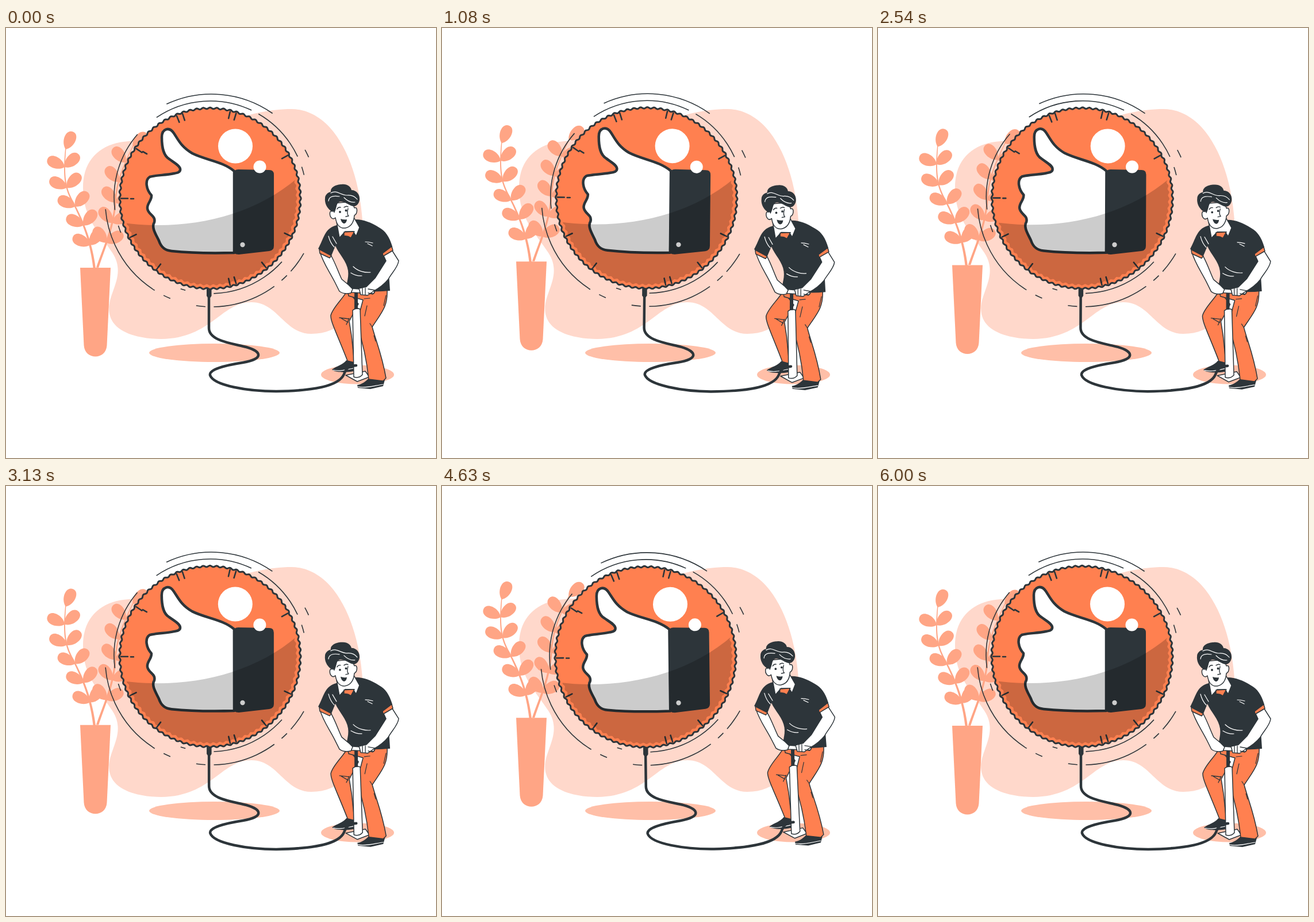
Recreate the animation shown at these times as an HTML page. Size 748x748 px, loop 6040 ms.

```html
<!DOCTYPE html>
<html lang="en">
<head>
<meta charset="utf-8">
<title>Pumping up the balloon</title>
<style>
  html, body { margin: 0; width: 100%; height: 100%; overflow: hidden; background: #fff; }
  svg { display: block; width: 100vw; height: 100vh; }
  .line { fill: none; stroke: #2d353a; stroke-linecap: round; stroke-linejoin: round; }
  .ink { fill: #2d353a; }
  .coral { fill: #ff8050; }
  .skin { fill: #fff; }
  .thin { stroke: #2d353a; stroke-width: 1.5; stroke-linecap: round; stroke-linejoin: round; }
  .fold { fill: none; stroke: #fff; stroke-width: 1.2; stroke-linecap: round; }
  .ring { fill: none; stroke: #2d353a; stroke-width: 1.6; }
</style>
</head>
<body>
<svg viewBox="0 0 748 748">
  <defs><clipPath id="inside"><path id="innerEdge"/></clipPath></defs>

  <path fill="#ffd8cb" d="M213 197C165 200 133 229 134 279C134 331 163 357 185 391C213 434 170 465 181 501C190 532 236 541 270 541C357 540 374 477 427 477C473 477 484 532 531 532C593 532 618 480 621 400C625 310 608 230 570 181C549 154 522 141 497 141C405 141 350 190 213 197Z"/>
  <ellipse cx="362.500" cy="565" rx="113.500" ry="16" fill="#ffbfa8"/>
  <ellipse cx="611.500" cy="603" rx="63.500" ry="16.500" fill="#ffbfa8"/>

  <g id="plant" fill="#ffa585">
    <path d="M129 417H182L175.500 552C174 578 137 578 135.500 552Z"/>
  </g>

  <g id="scene">
    <circle class="ring" r="167.500" pathLength="360" transform="translate(355.500 294.500) rotate(-124)" stroke-dasharray="59.300 4.700 35 6.600 5 55.400 46 17 3 50.500 4.400 9.500 48.400 15.200"/>
    <circle class="ring" r="185" pathLength="360" transform="translate(357.500 300) rotate(-115)" stroke-dasharray="60 26.500 4.500 53.800 12 3 4 5 35 4.500 5 14.500 4 5.500 53 69.700"/>
    <path id="rim" class="line" style="fill:#ff8050" stroke-width="3"/>
    <path id="creases" class="line" stroke-width="2.600"/>
    <path class="line" style="fill:#fff" stroke-width="4.500" d="M397 249C377 232 348 230 324 218C305 207 300 195 292 183C284 171 271 175 271 190C271 209 274 222 284 228C292 234 302 239 303 245C304 251 298 252 292 253C278 256 260 256 250 259C241 265 244 281 253 291C254 300 245 305 246 314C247 325 261 326 258 338C252 347 262 361 266 370C270 382 277 387 288 388C326 392 360 392 397 391Z"/>
    <path class="ink" d="M404 246L458 247Q466 247 466 255L466 379Q466 387 458 388L405 394Q395 394 395 386L396 254Q396 246 404 246Z"/>
    <circle cx="411.500" cy="377" r="4.200" fill="#fff"/>
    <path clip-path="url(#inside)" fill-opacity=".2" d="M190 338L204 339C310 353 425 331 507 261L520 250V470H190Z"/>
    <circle cx="399" cy="205.500" r="30" fill="#fff"/>
    <circle cx="441.500" cy="241.500" r="11" fill="#fff"/>

    <g id="man">
      <path class="skin thin" d="M591 604L625 597L632 607L611 615Z"/>
      <path class="ink" d="M567 594C575 588 586 586 592 578L606 582L605 597C590 600 570 599 567 594Z"/>
      <path class="fold" d="M569 595C582 598 592 594 604 592"/>
      <path class="coral thin" d="M594 456C588 469 568 486 565 500C564 510 577 535 594 579L606 582L601 535L597 510L613 480Z"/>
      <path class="line" stroke-width="1.300" d="M580 504L597 506M583 505L595 512M592 516L597 505"/>
      <path class="ink" d="M611 621C619 620 627 614 632 608L659 612L656 623L634 628L612 626Z"/>
      <path class="fold" d="M612 624C626 627 641 622 656 620"/>
      <path class="coral thin" d="M594 455L663 456C664 485 654 494 637 520C644 546 654 568 661 609L656 614L631 611C627 575 621 548 612 521C610 510 616 493 621 473L596 466Z"/>
      <path class="line" stroke-width="1.200" d="M628 483L624 501M661 465L657 483M633 514L637 520M640 535L643 545M623 471L633 470"/>
      <path class="skin thin" d="M603 491Q609 486 616 489L620 603Q614 610 605 607Z"/>
      <path class="ink" d="M606 456H612V489H606Z"/>

      <path class="ink" d="M572 344C554 350 553 366 543 384L566 396L573 379C579 393 593 406 595 422C597 437 590 446 594 454Q633 461 668 457L665 412L658 396L672 380C667 363 660 353 649 347C635 338 621 333 609 333Z"/>
      <path class="skin thin" d="M601 453L639 456Q643 459 639 462L601 460Z"/>
      <path class="skin thin" d="M546 389C551 408 563 424 572 442L580 458Q588 464 600 461L603 454L596 447L584 437C578 425 574 411 565 395Z"/>
      <path class="skin thin" d="M671 386L683 405C682 416 671 426 665 437C657 447 648 453 639 458L629 465L617 464L614 453L627 450L642 435L661 405L656 394Z"/>
      <path class="line" stroke-width="1.300" d="M620 452V463M625 452V464M630 454L641 456Q643 460 638 463L630 461"/>
      <path class="coral thin" d="M545 385L566 396L563 400L546 392Z"/>
      <path class="coral thin" d="M655 392L671 380L673 387L656 397Z"/>
      <path class="fold" d="M561 362Q564 374 571 381M568 363L575 375M625 372Q631 372 638 374M629 375L637 379M604 415C612 423 624 426 634 425M600 426Q610 432 619 431"/>
      <path class="skin thin" d="M575 337L580 365L590 354L604 354L609 362L615 347L606 331Z"/>
      <path class="coral thin" d="M588 355L606 354L600 365Q594 361 588 362Z"/>

      <path class="skin thin" d="M568 305L568 319C562 316 562 327 567 331Q570 333 573 330C575 342 581 349 590 348C600 346 605 339 606 326C612 323 612 310 606 313L602 302Z"/>
      <path class="ink" d="M565 318C558 313 554 304 555 296C555 290 560 286 565 285C564 277 574 272 584 272C593 271 600 276 601 282C610 282 616 290 615 299C614 306 609 311 604 310C597 309 592 303 583 302C575 302 576 309 573 317L571 322C569 317 567 318 565 318Z"/>
      <path class="fold" d="M561 301C562 291 573 292 580 293M565 287C575 281 582 291 593 291C602 290 607 293 611 298M588 295C593 300 599 304 607 303"/>
      <path class="line" stroke-width="1.400" d="M576 315Q578 311 582 312M588 312Q592 309 595 311M595 314C593 321 594 325 596 327L591 328"/>
      <circle cx="581" cy="320" r="1.900" class="ink"/>
      <circle cx="591.500" cy="317.500" r="1.900" class="ink"/>
      <path class="ink" d="M582 332Q588 334 593 333C592 343 584 342 582 332Z"/>
    </g>

    <path class="line" stroke-width="4.500" d="M353 464V522C353 545 396 549 418 555C446 563 448 576 412 582C380 587 353 594 355 604C361 622 421 632 470 632C532 631 579 624 588 602C592 591 597 588 609 587"/>
    <path class="ink" d="M349 453H357.500V466L355.500 469H351L349 466Z"/>
  </g>
</svg>
<script>
const LOOP = 6040, FRAME = 1000 / 24;
const get = id => document.getElementById(id);

function addPath(parent, d, transform = '') {
  const path = document.createElementNS('http://www.w3.org/2000/svg', 'path');
  path.setAttribute('d', d);
  path.setAttribute('transform', transform);
  parent.append(path);
  return path;
}

function balloonPoint(degrees, radius) {
  const a = degrees * Math.PI / 180;
  return `${355 + radius * Math.cos(a)} ${296.5 + radius * Math.sin(a)}`;
}

// Foil edge with evenly spaced crimps.
function crimpedCircle(radius) {
  const points = [];
  for (let a = 0; a < 360; a += 0.5) {
    points.push(balloonPoint(a, radius + 1.2 * Math.cos(84 * a * Math.PI / 180)));
  }
  return `M${points.join('L')}Z`;
}

// Creases come in pairs near the top and bottom of the balloon.
function creases() {
  const crease = a => `M${balloonPoint(a, 143)}L${balloonPoint(a, 155)}`;
  const marks = [-75, -29, 25, 51, 75, 127, 154, 180, 214, 250].map(a => {
    const paired = Math.abs(Math.sin(a * Math.PI / 180)) > 0.9;
    return paired ? crease(a - 2) + crease(a + 2) : crease(a);
  });
  return marks.join('') + 'M217 297H222M238 215L245 219';
}

// A tapering stem, a leaf on its tip and evenly spaced leaf pairs below.
function growStem(curve, tilt) {
  const stem = addPath(get('plant'), curve);
  const length = stem.getTotalLength();
  const left = [], right = [];
  for (let s = 0; s <= length; s += 4) {
    const { x, y } = stem.getPointAtLength(s);
    const half = 0.7 + 1.5 * s / length;
    left.push(`${x - half} ${y}`);
    right.unshift(`${x + half} ${y}`);
  }
  const leaf = (s, angle) => {
    const { x, y } = stem.getPointAtLength(s);
    addPath(get('plant'), 'M0 0C8 -13 33 -15 33 0C33 13 8 13 0 0Z',
      `translate(${x} ${y}) rotate(${angle + tilt})`);
  };
  leaf(3, -66);
  for (let i = 0; i < 5; i++) {
    leaf(34 + 36 * i, -153);
    leaf(34 + 36 * i, -41 - 3 * i);
  }
  stem.setAttribute('d', `M${left.concat(right).join('L')}Z`);
}

get('rim').setAttribute('d', crimpedCircle(157));
get('innerEdge').setAttribute('d', crimpedCircle(150.5));
get('creases').setAttribute('d', creases());
growStem('M104 208C98 270 106 284 120 310C138 346 149 378 154 420', 0);
growStem('M222 203C196 256 192 276 190 306C186 352 168 388 158 420', 25);

function draw(time) {
  const lift = 15 * (1 - Math.abs(1 - time % 3000 / 1500));
  const phase = time % 6000 / 1500;
  const sway = phase < 1 ? phase : phase < 3 ? 2 - phase : phase - 4;
  get('plant').setAttribute('transform', `translate(0 ${-lift})`);
  get('scene').setAttribute('transform', `rotate(${0.75 * sway} 428.5 374)`);
}

const start = performance.now();
function tick() {
  const elapsed = (performance.now() - start) % LOOP;
  draw(Math.floor((elapsed + 4.9) / FRAME) * FRAME);
  requestAnimationFrame(tick);
}
draw(0);
requestAnimationFrame(tick);
</script>
</body>
</html>
```
